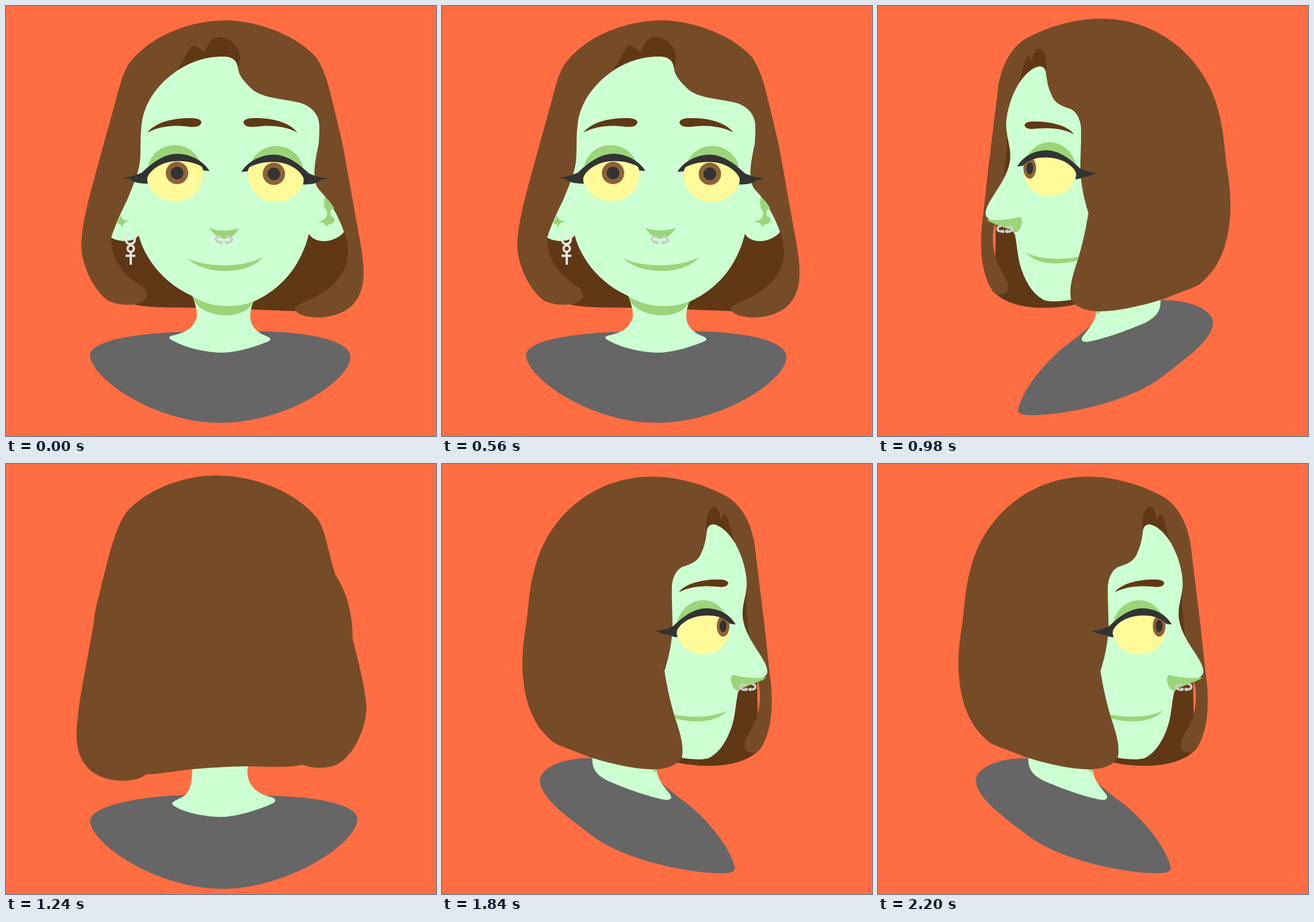
Animation, 748 px wide and 748 px high, one loop 2440 ms. Source, as an HTML page:

```html
<!DOCTYPE html>
<html lang="en">
<head>
<meta charset="utf-8">
<title>Turning head</title>
<style>
  html, body { margin: 0; width: 100%; height: 100%; overflow: hidden; background: #ff6d43; }
  svg { display: block; width: 100%; height: 100%; }
  .pose { visibility: hidden; }
  .hair { fill: #754c27; }
  .dark { fill: #603815; }
  .skin { fill: #ccffd1; }
  .shade { fill: #9bd479; }
  .white { fill: #fffa99; }
  .liner { fill: #333; }
  .iris { fill: #8c6239; }
  .shirt { fill: #666; }
  .ring { fill: none; stroke: #ccc; stroke-width: 4; stroke-linecap: round; }
  .ball { fill: #ccc; }
  .earring { fill: none; stroke: #e6e6e6; stroke-width: 4; }
</style>
</head>
<body>
<svg viewBox="0 0 748 748">
  <defs>
    <g id="eye">
      <path class="shade" d="M247 278A48 48 0 0 1 340 278Z"/>
      <path class="white" d="M246 298C252 281 270 268 295 267C315 267 330 273 342 279C348 320 320 340 294 340C268 340 250 322 246 304Z"/>
      <circle class="iris" cx="297.5" cy="290.5" r="19.5"/>
      <circle class="liner" cx="297.5" cy="290.5" r="11"/>
      <path class="liner" d="M204 298C215 298 226 294 236 290C255 272 275 257 299 257C325 258 345 272 354 287L343 286Q342 281 340 279C325 271 305 268 285 271C265 275 250 287 246 298Q245 304 247 309C236 309 222 308 215 301Q209 301 204 298Z"/>
    </g>
    <path id="brow" class="dark" d="M246 220C262 200 295 194 325 195C337 196 342 200 339 205C336 210 328 211 318 210C295 207 270 208 246 220Z"/>

    <g id="profile">
      <path class="shirt" d="M375 552C358 566 350 573 340 581C300 608 255 660 244 700C242 708 248 712 270 712C340 710 440 685 490 648C540 610 582 580 583 550C580 525 535 510 491 512Z"/>
      <path class="skin" d="M380 525C380 550 365 562 356 575C352 582 356 585 365 584C390 580 430 566 465 551C485 540 494 530 491 505Z"/>
      <path class="shade" d="M379 528L388 532L380 537Z"/>
      <path class="dark" d="M205 380L203 499C220 516 250 525 290 525Q318 525 345 519L366 360Z"/>
      <path class="hair" d="M387 22C340 22 290 38 255 58C228 76 212 110 208 150L194 265C190 295 186 340 181 380C176 430 182 470 200 497C207 504 222 505 226 494C230 480 215 465 207 445C200 425 197 400 203 380L366 360L348 440C340 465 332 490 335 508C340 522 360 531 385 531C415 531 450 524 496 510L545 491C555 487 560 484 565 479C592 455 608 420 612 370C615 345 612 310 606 275C602 240 600 200 585 160C560 90 490 22 387 22Z"/>
      <path class="dark" d="M223 212C226 240 222 270 218 306L234 275L231 240Z"/>
      <path class="dark" d="M245 134C252 110 256 90 261 87C265 88 267 95 268 99C270 82 274 74 280 74C290 76 294 95 293 112L285 125Z"/>
      <path class="skin" d="M280 105C265 108 250 125 242 140C228 165 222 195 223 212C225 235 231 245 230 265C228 290 212 312 202 328C193 342 187 352 187 362C188 370 200 376 212 381C222 384 234 389 238 397C243 420 242 440 252 465C262 490 275 505 290 512C300 515 320 514 336 511C331 490 340 465 348 440C357 410 362 385 366 360C358 335 353 310 352 285C352 260 354 230 353 210C351 195 345 184 335 179C320 174 308 170 302 155C295 140 294 130 292 115C290 107 286 105 280 105Z"/>
      <path class="dark" d="M341 223C330 208 300 200 268 201C255 202 253 207 257 211C262 215 270 214 280 213C305 211 325 215 341 223Z"/>
      <path class="shade" d="M255 270C265 247 282 237 299 237C320 237 340 254 344 276L300 280Z"/>
      <path class="white" d="M252 285C254 275 265 264 290 262C320 262 338 275 344 290C344 315 322 331 299 331C272 331 253 312 252 285Z"/>
      <ellipse class="iris" cx="264" cy="282" rx="11" ry="18.5"/>
      <ellipse class="liner" cx="264" cy="282" rx="6" ry="10.5"/>
      <path class="liner" d="M242 279C255 258 275 251 294 251C320 252 340 272 351 282C360 287 370 290 381 290C370 296 362 297 356 298Q350 302 343 301C346 295 345 288 340 283C325 265 300 262 280 264C265 267 256 272 252 278Z"/>
      <path class="shade" d="M188 371C200 374 230 372 245 367C251 367 251 375 250 379C248 388 242 397 235 393C225 386 195 378 188 371Z"/>
      <path class="ring" d="M213 383C206 384 207 391 212 392H216M225 384C233 382 237 388 232 391Q228 394 224 392"/>
      <circle class="ball" cx="217" cy="392" r="3"/>
      <circle class="ball" cx="224" cy="392" r="3"/>
      <path class="shade" d="M257 429C280 440 315 443 349 436L347 443C310 452 275 449 257 429Z"/>
    </g>
  </defs>

  <rect width="748" height="748" fill="#ff6d43"/>

  <g class="pose">
    <path class="shirt" d="M310 567C250 568 146 578 146 608C150 650 260 725 372 725C490 725 600 650 599 610C598 580 520 566 434 566Z"/>
    <path class="dark" d="M183 400V480L222 519C245 524 270 525 330 525L430 528L510 531L596 470V390Z"/>
    <path class="skin" d="M323 500C333 530 335 540 328 550C320 565 305 570 290 573C282 575 282 578 290 582C315 596 350 603 378 603C405 602 435 592 455 584C462 581 461 578 455 575C435 568 425 555 425 540C425 530 428 520 431 512Z"/>
    <path class="shade" d="M322 499L329 516C340 530 360 538 383 538C405 538 424 530 432 512Z"/>
    <path class="hair" d="M383 25C310 25 240 60 211 105C200 125 195 150 188 175L165 258C145 330 131 380 131 418C132 450 150 490 175 511C190 520 215 522 232 517C250 510 248 497 235 487C205 468 183 445 183 400L588 393C591 400 594 410 595 425C596 465 570 490 530 510C515 516 503 522 503 528C505 537 525 542 545 542C600 538 622 510 622 463C622 435 614 400 607 360C600 320 592 275 585 238L570 175C563 145 555 112 540 90C510 55 445 26 383 25Z"/>
    <path class="dark" d="M296 114C310 95 318 72 325 69C333 69 340 77 346 82C350 65 358 54 373 54C390 55 406 70 407 88Q407 98 404 108L350 125Z"/>
    <path class="skin" d="M377 88C345 88 320 98 297 113C262 137 240 170 236 205C233 230 235 250 233 270C231 290 220 315 211 337C202 355 190 380 183 403C192 408 205 410 215 408C222 407 228 403 231 399C240 435 270 480 323 504C355 526 400 526 431 514C485 490 515 445 527 396C530 403 540 409 553 409C568 409 582 401 588 393C578 365 563 338 545 320Q538 312 537 300C535 285 539 262 544 240C545 222 546 210 544 200C541 185 527 171 505 167C470 160 442 159 425 142C412 129 405 120 404 110C402 95 395 88 377 88Z"/>
    <use href="#brow"/>
    <use href="#brow" transform="translate(753) scale(-1 1)"/>
    <use href="#eye"/>
    <use href="#eye" transform="translate(763.5 1.5) scale(-1 1)"/>
    <path class="shade" d="M200 363C200 371 207 374 216 374C207 376 202 378 203 387C201 380 197 378 193 378Z"/>
    <path class="shade" d="M555 332C552 342 553 350 558 357C561 367 554 374 541 375C550 376 556 377 556 385C559 379 564 381 569 377C574 373 571 367 566 366C562 359 566 352 571 352Q565 341 555 332Z"/>
    <path class="shade" d="M353 385C365 392 390 392 406 386C400 396 392 405 380 405C368 405 360 395 353 385Z"/>
    <path class="ring" d="M374 402C366 399 363 405 366 408Q369 411 373 411M384 402C392 400 395 406 391 410Q388 412 385 411"/>
    <circle class="ball" cx="374" cy="411.5" r="3"/>
    <circle class="ball" cx="384" cy="411.5" r="3"/>
    <path class="shade" d="M315 439C350 455 410 456 447 437C432 455 405 461 380 461C350 460 330 452 315 439Z"/>
    <path class="earring" d="M215 395C206 401 207 414 216 414C224 414 226 405 222 401M217 428V450M208 434.500H225"/>
    <circle class="earring" cx="217" cy="422" r="5.500"/>
  </g>

  <g class="pose"><use href="#profile"/></g>

  <g class="pose">
    <path class="shirt" d="M313 576C230 578 146 595 146 622C152 665 265 739 379 739C490 738 612 660 611 617C610 592 540 578 450 577Z"/>
    <path class="skin" d="M323 522C325 550 322 562 313 575C305 582 288 586 289 592C300 603 340 614 375 614C405 613 440 601 465 590C472 585 468 580 455 578C430 570 414 550 422 522Z"/>
    <path class="hair" d="M366 20C300 20 240 50 211 82C190 110 180 155 163 224C157 245 154 260 152 280L132 390C125 430 122 460 123 480C126 525 155 551 205 551C225 550 238 546 243 540C260 540 290 535 323 531C370 527 400 526 422 526C460 527 495 528 516 523C530 529 550 530 567 526C605 515 628 455 627 420C624 385 612 340 603 305C603 260 592 220 573 193C560 150 556 120 545 100C515 55 440 20 366 20Z"/>
  </g>

  <g class="pose"><use href="#profile" transform="translate(753) scale(-1 1)"/></g>
</svg>
<script>
  const LOOP = 2440;
  const starts = [0, 600, 1240, 1840];
  const poses = document.querySelectorAll('.pose');
  const origin = performance.now();

  function draw() {
    const time = (performance.now() - origin) % LOOP;
    const current = starts.filter(start => start <= time).length - 1;
    poses.forEach((pose, i) => {
      pose.style.visibility = i === current ? 'visible' : 'hidden';
    });
    requestAnimationFrame(draw);
  }
  draw();
</script>
</body>
</html>
```
